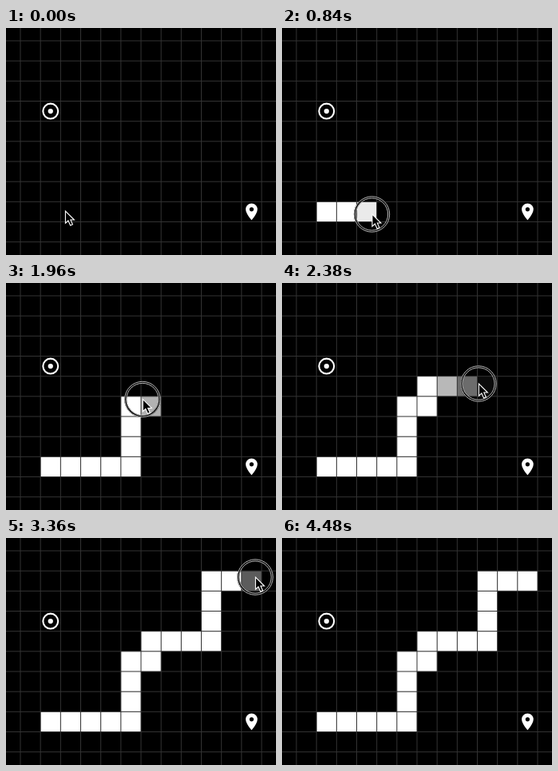
Animation, 338 px wide and 284 px high, one loop 4830 ms. Source, as an HTML page with a canvas:

```html
<!DOCTYPE html>
<html lang="en">
<head>
<meta charset="utf-8">
<title>Drawing walls on a grid</title>
<style>
  html, body { margin: 0; width: 100%; height: 100%; overflow: hidden; background: #000; }
  canvas { display: block; }
</style>
</head>
<body>
<canvas id="stage" width="338" height="284"></canvas>
<script>
const ctx = document.getElementById('stage').getContext('2d');
const W = 338, H = 284;
const LOOP = 4830, STEP = 70, LAST = 4480;
const CELL = 151 / 6, LEFT = 18, TOP = 16;
const DRAG_START = 420, DRAG_END = 3400, FADE = 300;

// Turning points of the pointer: time, x, y
const keys = [
  [0, 74, 229], [210, 60, 231], [420, 60, 231], [560, 93, 232],
  [840, 112.5, 233], [1100, 128, 234.5], [1330, 161, 217.5], [1540, 167, 165],
  [2030, 172, 142.5], [2380, 246, 126], [2590, 259, 74], [2940, 281, 51],
  [3160, 281.4, 50.6], [3360, 312, 49], [3780, 312, 49], [4060, 189.5, 200.5],
  [4130, 189.5, 200.5], [4480, 165, 295]
];

const clamp = v => Math.min(1, Math.max(0, v));

// Monotone cubic through the keys; the pointer rests where a value holds
function secant(i, axis) {
  const a = keys[i - 1], b = keys[i];
  return a && b ? (b[axis] - a[axis]) / (b[0] - a[0]) : 0;
}

function slope(i, axis) {
  const a = secant(i, axis), b = secant(i + 1, axis);
  return a * b > 0 ? 2 * a * b / (a + b) : 0;
}

function pointerAt(t) {
  const i = Math.max(1, keys.findIndex(k => k[0] >= t));
  const a = keys[i - 1], b = keys[i], span = b[0] - a[0];
  const u = (t - a[0]) / span, v = 1 - u, s = u * u * (3 - 2 * u);
  return [1, 2].map(axis =>
    a[axis] + (b[axis] - a[axis]) * s +
    span * u * v * (v * slope(i - 1, axis) - u * slope(i, axis)));
}

// Each cell starts to fade in when the pointer enters it
const walls = new Map();
for (let t = DRAG_START; t <= DRAG_END; t++) {
  const [x, y] = pointerAt(t);
  const i = Math.floor((x - LEFT) / CELL), j = Math.floor((y - TOP) / CELL);
  const key = i + ',' + j;
  if (!walls.has(key)) walls.set(key, { i, j, start: t });
}

function drawWalls(t) {
  for (const { i, j, start } of walls.values()) {
    ctx.fillStyle = `rgba(255,255,255,${clamp((t - start) / FADE)})`;
    ctx.fillRect(LEFT + i * CELL, TOP + j * CELL, CELL, CELL);
  }
}

function drawGrid() {
  ctx.fillStyle = '#333';
  for (let x = LEFT - 0.5; x < W; x += CELL) ctx.fillRect(x, 0, 1, H);
  for (let y = TOP - 0.5; y < H; y += CELL) ctx.fillRect(0, y, W, 1);
}

function disc(x, y, r, color) {
  ctx.beginPath();
  ctx.arc(x, y, r, 0, Math.PI * 2);
  ctx.fillStyle = color;
  ctx.fill();
}

function ring(x, y, r, width, color) {
  ctx.beginPath();
  ctx.arc(x, y, r, 0, Math.PI * 2);
  ctx.lineWidth = width;
  ctx.strokeStyle = color;
  ctx.stroke();
}

// Draws in a 24-unit box fitted to one cell
function inCell(i, j, draw) {
  ctx.save();
  ctx.translate(LEFT + i * CELL, TOP + j * CELL);
  ctx.scale(CELL / 24, CELL / 24);
  draw();
  ctx.restore();
}

const pin = new Path2D('M12 2C8.13 2 5 5.13 5 9C5 14.25 12 22 12 22S19 14.25 19 9C19 5.13 15.87 2 12 2Z');

function drawMarkers() {
  inCell(1, 3, () => {
    ring(12, 12, 9, 2, '#fff');
    disc(12, 12, 3, '#fff');
  });
  inCell(11, 8, () => {
    ctx.fillStyle = '#fff';
    ctx.fill(pin);
    disc(12, 9, 2.5, '#000');
  });
}

const arrow = new Path2D('M0 0V15.2L3.5 12L6.2 18L9 16.8L6.4 11H11Z');

function drawPointer(t) {
  const [x, y] = pointerAt(t);
  ctx.globalAlpha = clamp((t - 70) / 140) * clamp((3640 - t) / 140);
  ring(x, y, 21.2, 3, '#000');
  ring(x, y, 22.2, 0.9, '#ccc');
  ring(x, y, 20.1, 0.9, '#ccc');
  ctx.globalAlpha = 1;

  ctx.save();
  ctx.translate(x + 0.4, y);
  ctx.fillStyle = '#000';
  ctx.fill(arrow);
  ctx.lineWidth = 1.1;
  ctx.strokeStyle = '#fff';
  ctx.stroke(arrow);
  ctx.restore();
}

function frame() {
  const now = performance.now() % LOOP;
  const t = Math.min(LAST, Math.floor(now / STEP) * STEP);
  ctx.fillStyle = '#000';
  ctx.fillRect(0, 0, W, H);
  drawWalls(t);
  drawGrid();
  drawMarkers();
  drawPointer(t);
  requestAnimationFrame(frame);
}
frame();
</script>
</body>
</html>
```
